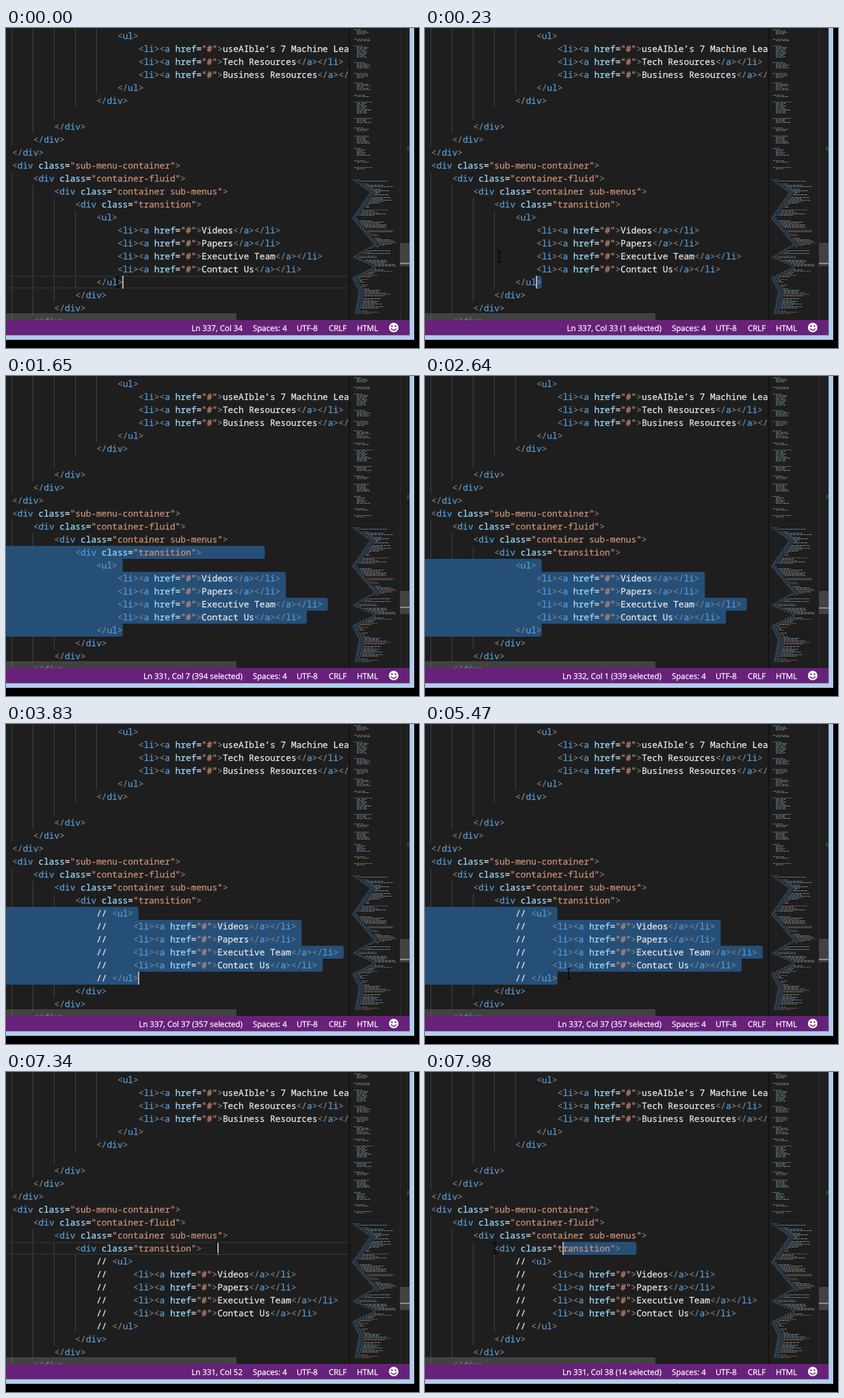
Animation of 604x469 px, one loop 8000 ms. Source, as an HTML page:

```html
<!DOCTYPE html>
<html lang="en">
<head>
<meta charset="utf-8">
<title>Code editor</title>
<style>
  html, body { margin: 0; width: 100%; height: 100%; overflow: hidden; background: #000; }
  svg { display: block; }
  text { white-space: pre; text-rendering: geometricPrecision; fill: var(--ink); stroke: var(--ink); stroke-width: .25px; }
  #editor text { font: 12.83px "Noto Sans Mono", "DejaVu Sans Mono", monospace; }
  #bar text { font: 11.5px "Open Sans", "Noto Sans", sans-serif; --ink: #fff; }
  .p { --ink: #808080; }
  .tag { --ink: #569cd6; }
  .attr { --ink: #9cdcfe; }
  .str { --ink: #ce9178; }
  .txt { --ink: #e8e8e8; }
</style>
</head>
<body>
<svg width="604" height="469" viewBox="0 0 604 469">
  <clipPath id="pane"><rect width="501" height="428"/></clipPath>
  <rect width="597" height="457" fill="#b3cdea"/>
  <path d="M590.5 0V450.5H0" fill="none" stroke="#8aa0b8"/>
  <rect width="590" height="450" fill="#1e1e1e"/>
  <g id="editor" clip-path="url(#pane)">
    <g id="guides" fill="#404040"></g>
    <rect id="current" x="-4" y="1" width="510" height="17" fill="none" stroke="#2b2b2b" stroke-width="2"/>
    <g id="selection" fill="#264f78"></g>
    <g id="code"></g>
    <g id="plain"></g>
    <g id="commented"></g>
    <rect id="caret" width="2" height="19" fill="#aeafad"/>
    <rect y="418" width="337" height="10" fill="#797979" fill-opacity=".4"/>
  </g>
  <rect x="501" width="3" height="428" fill="#000" fill-opacity=".3"/>
  <g id="minimap"></g>
  <g>
    <rect x="576" width="1" height="428" fill="#303030"/>
    <rect x="576" y="315" width="14" height="34" fill="#424242"/>
    <rect x="586" y="174" width="4" height="6" fill="#1c4a26"/>
    <rect id="mark" x="576" width="14" height="2" fill="#8c8c8c"/>
  </g>
  <g id="bar">
    <rect y="428" width="590" height="22" fill="#68217a"/>
    <text id="status" x="346" y="444" text-anchor="end"></text>
    <text x="361" y="444">Spaces: 4</text>
    <text x="425" y="444">UTF-8</text>
    <text x="472" y="444">CRLF</text>
    <text x="513" y="444">HTML</text>
    <circle cx="567" cy="439" r="7" fill="#fff"/>
    <g fill="#68217a"><circle cx="564.5" cy="437" r="1.2"/><circle cx="569.5" cy="437" r="1.2"/></g>
    <path d="M563 440.5q4 5 8 0" fill="none" stroke="#68217a" stroke-width="1.3"/>
  </g>
  <path id="mouse" d="M-3.5-8h2.5l1 1 1-1h2.5M0-7V7M-3.5 8h2.5l1-1 1 1h2.5" fill="none" stroke="#000" stroke-width="1.2"/>
</svg>
<script>
const LOOP = 8000, START = 100, TICK = 109.4;
const CHAR = 7.697, ROW = 19, TOP = 2, FIRST_LINE = 318;
const HIDDEN = 12;                       // columns scrolled off to the left
const COMMENT = 34, DESELECT = 51, CLICK = 66;   // in ticks
const BLINK = 4;
const $ = id => document.getElementById(id);

function add(parent, name, attrs, text) {
  const el = document.createElementNS("http://www.w3.org/2000/svg", name);
  for (const key in attrs) el.setAttribute(key, attrs[key]);
  if (text !== undefined) el.textContent = text;
  parent.append(el);
  return el;
}

const link = label => `<li><a href="#">${label}</a></li>`;
const div = name => `<div class="${name}">`;
const lines = [
  [20, "<ul>"],
  [24, link("useAIble’s 7 Machine Learning")],
  [24, link("Tech Resources")],
  [24, link("Business Resources")],
  [20, "</ul>"],
  [16, "</div>"],
  [12, ""],
  [8, "</div>"],
  [4, "</div>"],
  [0, "</div>"],
  [0, div("sub-menu-container")],
  [4, div("container-fluid")],
  [8, div("container sub-menus")],
  [12, div("transition") + " ".repeat(11)],
  [16, "<ul>"],
  [20, link("Videos")],
  [20, link("Papers")],
  [20, link("Executive Team")],
  [20, link("Contact Us")],
  [16, "</ul>"],
  [12, "</div>"],
  [8, "</div>"],
  [4, "</div>"]
];
const inBlock = row => row >= 14 && row <= 19;
const rowY = row => TOP + row * ROW;
const colX = col => 9 + (col - 1 - HIDDEN) * CHAR;
const codeX = col => colX(HIDDEN + 1 + col);

function drawLine(parent, row, indent, source) {
  const rule = /(<\/?)|((?<=<\/?)\w+)|( ?\w+(?==))|("[^"]*")|(>)|(=|[^<>="]+)/g;
  const kinds = ["p", "tag", "attr", "str", "p", "txt"];
  for (const m of source.matchAll(rule)) {
    const kind = kinds[m.slice(1).findIndex(part => part !== undefined)];
    add(parent, "text", { x: codeX(indent + m.index), y: rowY(row) + 14, class: kind }, m[0]);
  }
}

lines.forEach(([indent, source], row) => {
  const depth = inBlock(row) ? 16 : indent;
  for (let c = 0; c < depth && c < 20; c += 4) {
    add($("guides"), "rect", {
      x: Math.floor(codeX(c) - .1), y: row ? rowY(row) : 0, width: 1, height: row ? ROW : ROW + TOP
    });
  }
  drawLine(inBlock(row) ? $("plain") : $("code"), row, indent, source);
  if (inBlock(row)) drawLine($("commented"), row, 16, "// " + " ".repeat(indent - 16) + source);
});

// Eased lookup between key points [key, ...values].
function along(points, key, ease = u => u) {
  let i = 1;
  while (i < points.length - 1 && points[i][0] < key) i++;
  const a = points[i - 1], b = points[i];
  const u = ease(Math.min(1, Math.max(0, (key - a[0]) / (b[0] - a[0]))));
  return a.slice(1).map((v, k) => v + (b[k + 1] - v) * u);
}

function drawMinimap() {
  let seed = 7;
  const rnd = (lo, hi) => lo + (hi - lo) * (seed = seed * 16807 % 2147483647) / 2147483647;
  const pick = list => list[Math.floor(rnd(0, list.length))];
  const dash = (x, y, w, color) => add($("minimap"), "path", {
    d: `M${x} ${y}H${Math.max(x, Math.min(576, x + w))}`, stroke: color, "stroke-opacity": .55,
    "stroke-dasharray": `${rnd(2, 5)} 1`
  });

  // style rules
  for (let y = 2.5; y < 214; y += 8) {
    dash(509, y, rnd(10, 28), "#d7ba7d");
    for (let k = rnd(0, 8); k > 0 && y < 212; k--) {
      const w = rnd(5, 10);
      dash(513, y += 2, w, "#9cdcfe");
      dash(514 + w, y, rnd(3, 11), "#d4d4d4");
    }
  }
  // markup, nesting in and out
  const nesting = [[222, 506], [241, 532], [279, 506], [317, 538], [336, 506], [350, 538], [366, 506], [386, 516], [420, 510]];
  for (let y = 222.5; y < 420; y += 2) {
    const [x] = along(nesting, y);
    const w = rnd(0, 1) ** 1.5 * 44 + 4;
    dash(x, y, Math.min(w, 8), "#569cd6");
    if (w > 10) dash(x + 9, y, w - 9, pick(["#ce9178", "#9cdcfe", "#d4d4d4"]));
  }
}
drawMinimap();

// Pointer key points: tick, x, y.
const path = [
  [0, 163, 372], [4, 39, 288], [10, -33, 262], [17, -33, 262], [20, -80, 276],
  [42, -80, 276], [43, 72, 325], [47, 210, 366], [DESELECT, 210, 366], [58, 208, 382],
  [62, 200, 381], [64, 300, 88], [CLICK, 308, 258], [71, 205, 258], [72, 102, 258]
];
const pointer = tick => along(path, tick, u => 1 - (1 - u) ** 2);

function lineLength(row, commented) {
  const [indent, source] = lines[row];
  return HIDDEN + indent + source.length + (commented && inBlock(row) ? 3 : 0);
}

function hit([x, y], commented) {
  const row = Math.floor((y - 4 - TOP) / ROW);
  const col = Math.floor((x - colX(1)) / CHAR) + 1;
  return [row, Math.max(1, Math.min(col, lineLength(row, commented) + 1))];
}

// Selection as [anchor, head]; a drag trails the pointer by one tick.
function ends(tick) {
  const end = [19, 37], click = [13, 52];
  if (tick < 0) return [[19, 34], [19, 34]];
  if (tick < COMMENT) return [[19, 34], hit(pointer(tick - 1), false)];
  if (tick < DESELECT) return [[14, 1], end];
  if (tick < CLICK) return [end, end];
  return [click, tick === CLICK ? click : hit(pointer(tick - 1), true)];
}

function caretOn(tick) {
  if (tick < COMMENT || tick >= CLICK) return true;
  const since = tick - (tick < DESELECT ? COMMENT : DESELECT);
  return Math.floor(since / BLINK) % 2 === 0;
}

// Draws the selection and returns its length, line breaks counting two.
function select(anchor, head, commented) {
  const group = $("selection");
  group.replaceChildren();
  const [from, to] = [anchor, head].sort((a, b) => a[0] - b[0] || a[1] - b[1]);
  let total = 0, last = null;
  for (let row = from[0]; row <= to[0]; row++) {
    const len = lineLength(row, commented);
    const c1 = row === from[0] ? from[1] : 1;
    const c2 = row === to[0] ? to[1] : len + 2;
    total += c2 - c1 + (row === to[0] ? 0 : 1);
    const left = Math.max(-9, colX(c1)), right = colX(c2), y = rowY(row);
    if (right > left) {
      add(group, "rect", { x: left, y, width: right - left, height: ROW, rx: 3 });
      if (last) {
        const x = Math.max(left, last[0]);
        add(group, "rect", { x, y: y - 4, width: Math.max(0, Math.min(right, last[1]) - x), height: 8 });
      }
    }
    last = [left, right];
  }
  return total;
}

function draw(tick) {
  const commented = tick >= COMMENT;
  const [anchor, head] = ends(tick);
  const [row, col] = head;
  const count = select(anchor, head, commented);
  const show = (id, on) => $(id).style.display = on ? "" : "none";
  const move = (id, x, y) => $(id).setAttribute("transform", `translate(${x} ${y})`);
  show("plain", !commented);
  show("commented", commented);
  show("current", !count);
  show("caret", caretOn(tick));
  move("current", 0, rowY(row));
  move("caret", Math.floor(colX(col)), rowY(row));
  move("mark", 0, FIRST_LINE + row + 7);
  move("mouse", ...pointer(tick));
  $("status").textContent = `Ln ${FIRST_LINE + row}, Col ${col}` + (count ? ` (${count} selected)` : "");
}

let shown;
function frame() {
  const tick = Math.floor((performance.now() % LOOP - START) / TICK);
  if (tick !== shown) draw(shown = tick);
  requestAnimationFrame(frame);
}
frame();
</script>
</body>
</html>
```
